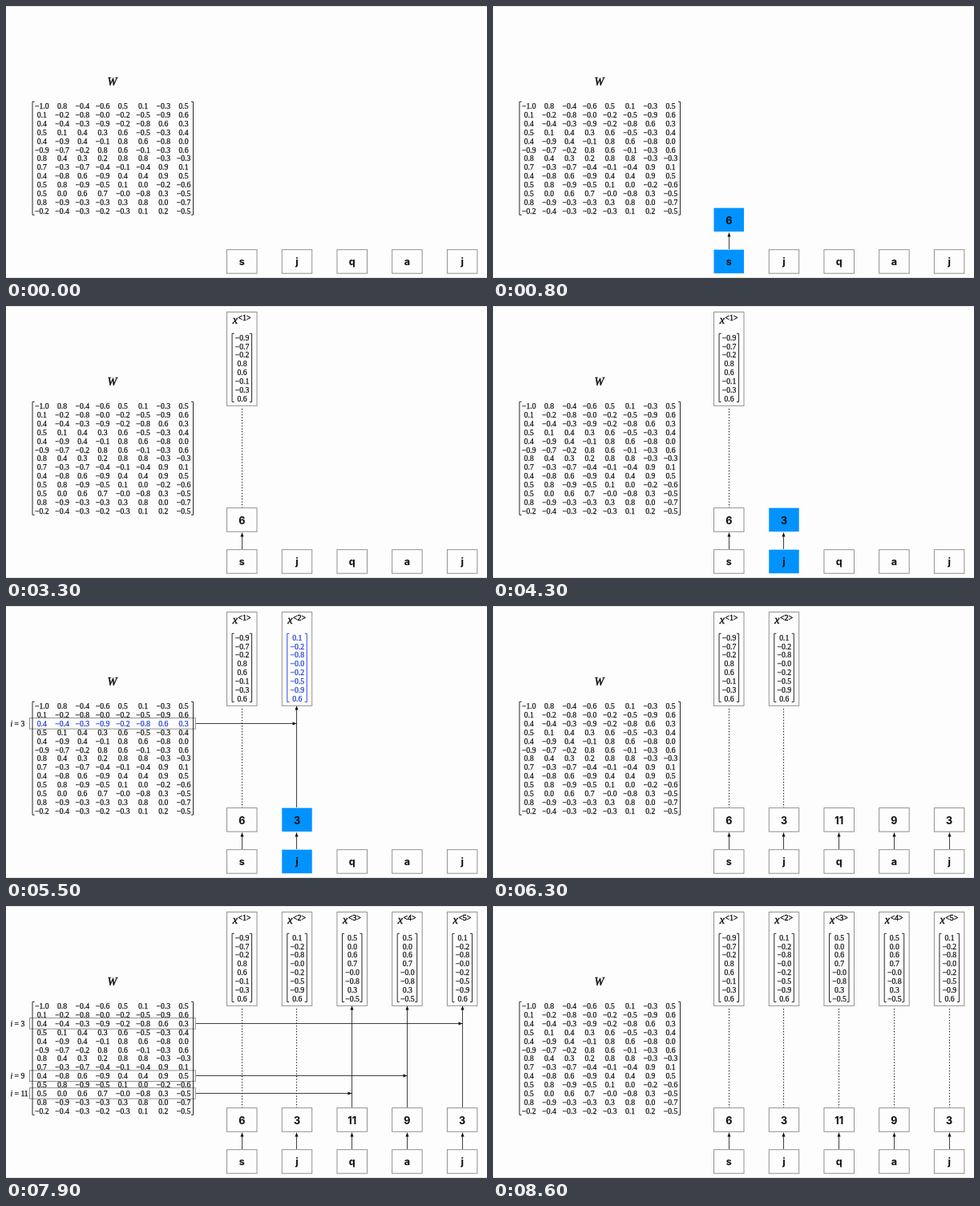
An HTML page with a canvas for the animation above (9800 ms loop, 600 by 339 pixels).

```html
<!DOCTYPE html>
<html lang="en">
<head>
<meta charset="utf-8">
<title>Embedding lookup</title>
<style>
  html, body { margin: 0; overflow: hidden; background: #fdfdfd; }
  canvas { display: block; width: 600px; height: 339px; }
</style>
</head>
<body>
<canvas id="stage" width="600" height="339"></canvas>
<script>
const ctx = document.getElementById('stage').getContext('2d');
const LOOP = 9800, ROWS = 13, COLS = 8;
const PAPER = '#fdfdfd', INK = '#111', BORDER = '#858585', FILL = '#0093ff', BLUE = '#1c3bd2';
const SERIF = '"Liberation Serif", serif';
const DIGITS = '9.7px ' + SERIF;
const SANS = '700 12.5px Inter, "Liberation Sans", sans-serif';

// Rows that the lookups point out; all other weights are random.
const keyRows = {
  2: '0.1 -0.2 -0.8 -0.0 -0.2 -0.5 -0.9 0.6',
  3: '0.4 -0.4 -0.3 -0.9 -0.2 -0.8 0.6 0.3',
  6: '-0.9 -0.7 -0.2 0.8 0.6 -0.1 -0.3 0.6',
  9: '0.4 -0.8 0.6 -0.9 0.4 0.4 0.9 0.5',
  11: '0.5 0.0 0.6 0.7 -0.0 -0.8 0.3 -0.5',
};

let seed = 7;
function random() {
  seed = (seed * 16807) % 2147483647;
  return seed / 2147483647;
}

const randomRow = () => Array.from({ length: COLS }, () => (random() * 2 - 1).toFixed(1));
const weights = Array.from({ length: ROWS }, (_, i) => {
  const row = keyRows[i + 1]?.split(' ') ?? randomRow();
  return row.map(v => v.replace('-', '\u2212'));
});

// Start time of each stage of a lookup.
const first = { lit: 200, index: 800, link: 1300, mark: 1800, flip: 2300, vec: 2800, done: 3300 };
const second = { lit: 3800, index: 4300, link: 4700, mark: 4700, flip: 5300, vec: 5300, done: 5800 };
const rest = { lit: Infinity, index: 6300, link: 6800, mark: 6800, flip: 7400, vec: 7900, done: 8600 };

// id is the looked-up row, shown is the row printed in the vector.
const columns = [
  { letter: 's', id: 6, shown: 6, at: first },
  { letter: 'j', id: 3, shown: 2, at: second },
  { letter: 'q', id: 11, shown: 11, at: rest },
  { letter: 'a', id: 9, shown: 11, at: rest },
  { letter: 'j', id: 3, shown: 2, at: rest },
].map((c, i) => ({ ...c, n: i + 1, x: 294.25 + i * 68.72 }));

const rowY = n => 125 + (n - 1) * 10.88;
const crisp = v => Math.floor(v) + 0.5;

function text(s, x, y, font, color = INK, align = 'center', weight = 0.25) {
  ctx.font = font;
  ctx.fillStyle = ctx.strokeStyle = color;
  ctx.textAlign = align;
  ctx.lineWidth = weight;
  ctx.fillText(s, x, y);
  ctx.strokeText(s, x, y);
}

function path(points, color = INK, width = 0.8) {
  ctx.strokeStyle = color;
  ctx.lineWidth = width;
  ctx.beginPath();
  points.forEach(([x, y]) => ctx.lineTo(x, y));
  ctx.stroke();
}

function arrow(points) {
  path(points);
  const [[px, py], [x, y]] = points.slice(-2);
  const dx = Math.sign(x - px), dy = Math.sign(y - py);
  ctx.fillStyle = INK;
  ctx.beginPath();
  ctx.moveTo(x, y);
  ctx.lineTo(x - 5 * dx + 2.1 * dy, y - 5 * dy + 2.1 * dx);
  ctx.lineTo(x - 5 * dx - 2.1 * dy, y - 5 * dy - 2.1 * dx);
  ctx.fill();
}

function brackets(left, right, top, bottom, color = INK) {
  for (const [x, lip] of [[left, 2.6], [right, -2.6]]) {
    path([[x + lip, top], [x, top], [x, bottom], [x + lip, bottom]], color, 0.9);
  }
}

function box(x, y, w, h, lit = false) {
  ctx.fillStyle = lit ? FILL : PAPER;
  ctx.fillRect(x, y, w, h);
  if (lit) return;
  ctx.strokeStyle = BORDER;
  ctx.lineWidth = 0.9;
  ctx.strokeRect(x, y, w, h);
}

function matrixRow(n, color) {
  weights[n - 1].forEach((v, i) => text(v, 44.7 + i * 25.25, rowY(n) + 3.2, DIGITS, color));
}

function label(n) {
  const y = rowY(n) + 3.2;
  text('i', 5.5, y, 'italic ' + DIGITS, INK, 'left');
  text('= ' + n, 10.5, y, DIGITS, INK, 'left');
}

function drawMatrix(t) {
  text('W', 132.5, 98.5, 'italic 14.3px ' + SERIF, INK, 'center', 0.45);
  for (let n = 1; n <= ROWS; n++) matrixRow(n);
  for (const { id, at } of columns) {
    if (t < at.mark || t >= at.done) continue;
    box(29.5, rowY(id) - 7.1, 206.7, 13.5);
    matrixRow(id, t >= at.lit ? BLUE : INK);
    label(id);
  }
  brackets(33, 233.5, 119.3, 260.3);
}

function drawLink({ x, id, at }, t) {
  const cx = crisp(x), y = crisp(rowY(id) - 0.7);
  if (t >= at.done) {
    ctx.setLineDash([1.3, 2.2]);
    path([[cx, 128], [cx, 251]], INK, 1.1);
    ctx.setLineDash([]);
  } else if (t >= at.flip) {
    arrow([[237, y], [cx, y]]);
    arrow([[cx, 251], [cx, 124.5]]);
  } else if (t >= at.link) {
    arrow([[cx, 251], [cx, y], [236.5, y]]);
  }
}

function drawVector({ x, n, shown, at }, t) {
  const color = t >= at.lit && t < at.done ? BLUE : INK;
  box(x - 18.75, 7.6, 37.5, 116.7);
  text('x', x - 11.6, 22, 'italic 14px ' + SERIF, INK, 'left', 0.4);
  text(`<${n}>`, x - 5, 18, '10px ' + SERIF, INK, 'left', 0.4);
  weights[shown - 1].forEach((v, i) => text(v, x + 0.3, 42.8 + i * 10.82, DIGITS, color));
  brackets(x - 12.2, x + 12.3, 34.3, 119.6, color);
}

function drawColumn(c, t) {
  const { x, at } = c;
  const lit = t >= at.lit && t < at.done;
  const left = x - 18.75, cx = crisp(x);
  drawLink(c, t);
  box(left, 303.7, 37.5, 29.5, lit);
  text(c.letter, x, 323.4, SANS, INK, 'center', 0.1);
  if (t >= at.index) {
    box(left, 251.7, 37.5, 29.5, lit);
    text(c.id, x, 271.7, SANS, INK, 'center', 0.1);
    arrow([[cx, 303], [cx, 282.5]]);
  }
  if (t >= at.vec) drawVector(c, t);
}

function draw(t) {
  ctx.fillStyle = PAPER;
  ctx.fillRect(0, 0, 600, 339);
  path([[0, 0.5], [600, 0.5]], '#dcdcdc');
  path([[0, 338.5], [600, 338.5]], '#dcdcdc');
  drawMatrix(t);
  columns.forEach(c => drawColumn(c, t));
}

const start = performance.now();
function tick() {
  draw((performance.now() - start) % LOOP);
  requestAnimationFrame(tick);
}
tick();
</script>
</body>
</html>
```
